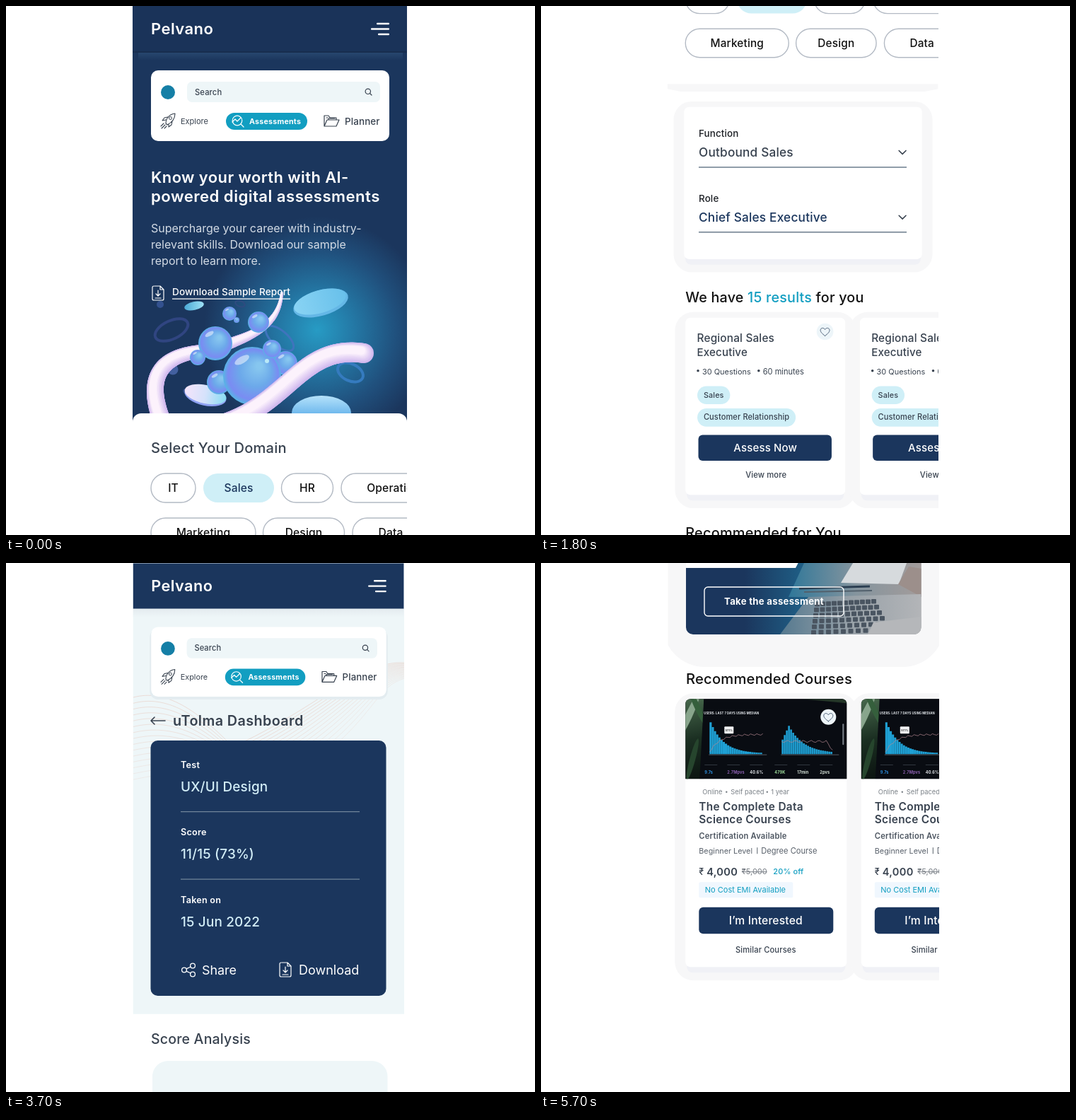
Animation of 748x748 px, one loop 6200 ms. Source, as an HTML page with a canvas:

```html
<!DOCTYPE html>
<html lang="en">
<head>
<meta charset="utf-8">
<title>Assessment app walkthrough</title>
<style>
html, body { margin: 0; width: 100%; height: 100%; overflow: hidden; background: #fff; }
canvas { display: block; width: 748px; height: 748px; }
</style>
</head>
<body>
<canvas id="stage"></canvas>
<script>
const SIZE = 748, LOOP = 6200, SHRINK = 0.9866;
const NAVY = '#1b365d', TEAL = '#129ec1', MINT = '#eef6f8', AQUA = '#cfeff7', INK = '#38424f';
const LEVELS = ['#93d9f2', '#5bbbdd', TEAL, NAVY];
const canvas = document.getElementById('stage');
const c = canvas.getContext('2d');
const dpr = window.devicePixelRatio || 1;
canvas.width = canvas.height = SIZE * dpr;

// ---------- helpers ----------
function group(draw, dx = 0, dy = 0, scale = 1) {
  c.save();
  c.translate(dx, dy);
  c.scale(scale, scale);
  draw();
  c.restore();
}

function paint(fill, stroke, width = 1.2) {
  if (fill) { c.fillStyle = fill; c.fill(); }
  if (stroke) { c.strokeStyle = stroke; c.lineWidth = width; c.stroke(); }
}

function box(x, y, w, h, r, fill, stroke, width) {
  c.beginPath();
  c.roundRect(x, y, w, h, r);
  paint(fill, stroke, width);
}

function disc(x, y, r, fill, stroke, width) {
  c.beginPath();
  c.arc(x, y, r, 0, 7);
  paint(fill, stroke, width);
}

function oval(x, y, rx, ry, deg, fill, stroke, width) {
  c.beginPath();
  c.ellipse(x, y, rx, ry, deg * Math.PI / 180, 0, 7);
  paint(fill, stroke, width);
}

function poly(points, fill, stroke, width) {
  c.beginPath();
  for (let i = 0; i < points.length; i += 2) c.lineTo(points[i], points[i + 1]);
  paint(fill, stroke, width);
}

function path(d, x, y, color, width = 1.2) {
  group(() => {
    c.strokeStyle = color;
    c.lineWidth = width;
    c.lineCap = c.lineJoin = 'round';
    c.stroke(new Path2D(d));
  }, x, y);
}

function linear(x0, y0, x1, y1, ...colors) {
  const g = c.createLinearGradient(x0, y0, x1, y1);
  colors.forEach((col, i) => g.addColorStop(i / (colors.length - 1), col));
  return g;
}

// y is the middle of the capital letters; heavier weights are set looser
function text(str, x, y, size, weight = 400, color = INK, align = 'left') {
  const tracking = weight >= 600 ? 0.02 : weight === 500 ? 0.01 : 0;
  c.font = `${weight} ${size}px Inter, "Open Sans", sans-serif`;
  c.letterSpacing = `${size * tracking}px`;
  c.textAlign = align;
  c.fillStyle = color;
  c.fillText(str, x, y + size * 0.36);
  return c.measureText(str).width;
}

function runs(x, y, size, ...parts) {
  for (const [str, weight, color] of parts) x += text(str, x, y, size, weight, color);
}

function fact(label, value, x, y, size) {
  runs(x, y, size, [label + ': ', 400], [value, 600]);
}

function card(x, y, w, h) {
  box(x - 15, y - 8, w + 30, h + 27, 26, '#f7f7f8');
  box(x + 2, y + 8, w - 4, h, 8, '#f0f1f6');
  box(x, y, w, h, 7, '#fff');
}

// ---------- icons ----------
const chevron = (x, y, color) => path('M-5-2.5L0 2.5L5-2.5', x, y, color, 1.6);

function heart(x, y, r) {
  disc(x, y, r, '#edf5f9');
  path('M0 6C-4 3-6.5 0.5-6.5-2C-6.5-5.5-2-6.5 0-3C2-6.5 6.5-5.5 6.5-2C6.5 0.5 4 3 0 6Z', x, y, '#4d6077', 1);
}

const fileIcon = (x, y, color) =>
  path('M-5-10H3L8-5V8Q8 10 6 10H-6Q-8 10-8 8V-8Q-8-10-6-10M3-10V-5H8M0-4V4M-3 1L0 4L3 1M-4 7H4', x, y, color, 1.2);

function shareIcon(x, y) {
  for (const [dx, dy] of [[-6, 0], [6, -6], [6, 6]]) disc(x + dx, y + dy, 3.4, null, '#fff', 1.3);
  path('M-3-1.6L3-4.5M-3 1.6L3 4.5', x, y, '#fff', 1.3);
}

// ---------- shared top ----------
function header(fill) {
  box(179, 0, 388, 65, 0, fill);
  text('Pelvano', 205, 32.5, 22, 600, '#fff');
  [[524, 25], [516, 32.5], [526, 40]].forEach(([x, y]) => box(x, y - 1.2, 542 - x, 2.4, 1, '#fff'));
}

function searchCard() {
  box(205, 91, 337, 100, 10, '#fff');
  disc(229, 122, 10, '#157fa6');
  box(256, 107, 273, 29, 7, MINT);
  text('Search', 267, 121.5, 11.2, 500);
  disc(511.8, 120.8, 3.7, null, INK, 1.2);
  path('M0 0L2.5 2.5', 514.5, 123.5, INK);
  path('M-4 4C-4-3 1-9 9-10C9-2 4 3-2 6ZM-4-1L-9 0L-6-4L-1-5M0 5L0 9L4 6L5 1M-5 6L-10 11M-7 4L-11 8M-3 8L-6 11', 230, 162, INK, 1.1);
  disc(232.5, 158.5, 2, null, INK, 1);
  text('Explore', 247, 163, 11, 400);
  box(311, 151, 115, 24, 12, TEAL);
  disc(327, 162, 6.8, null, '#fff', 1.2);
  path('M-7 2L-3-2L0 1L5-4M5 5L9 9', 327, 162, '#fff', 1.3);
  text('Assessments', 344, 163, 10.7, 700, '#fff');
  path('M-10 7V-8H-4L-2-5H7V-2M-10 7L-6-2H11L7 7ZM-7-5H-5M-4-2V-4H5', 460, 163, INK, 1.2);
  text('Planner', 479, 163, 13.4, 500);
}

// ---------- hero art ----------
function sphere(x, y, r) {
  const g = c.createRadialGradient(x + r * 0.25, y - r * 0.35, r * 0.1, x, y, r);
  [[0, '#86c6ef'], [0.5, '#6ca9ea'], [0.85, '#7a8cf2'], [1, '#56b6e4']].forEach(s => g.addColorStop(...s));
  disc(x, y, r, g);
  oval(x - r * 0.35, y - r * 0.55, r * 0.28, r * 0.12, -30, 'rgba(255,255,255,.5)');
}

// nested strokes from a lilac rim to a pale core
function tube(curves) {
  for (let layer = 0; layer < 8; layer++) {
    const k = layer / 7, lift = -0.26 * k;
    const color = `rgb(${208 + 44 * k},${184 + 58 * k},${238 + 14 * k})`;
    for (const [x0, y0, x1, y1, x2, y2, x3, y3, r0, r1] of curves) {
      for (let i = 0; i <= 150; i++) {
        const t = i / 150, u = 1 - t, r = r0 + (r1 - r0) * t;
        const mix = (a, b, d, e) => u * u * u * a + 3 * u * u * t * b + 3 * u * t * t * d + t * t * t * e;
        disc(mix(x0, x1, x2, x3) + r * lift, mix(y0, y1, y2, y3) + r * lift, r * (1 - 0.6 * k), color);
      }
    }
  }
}

function heroArt() {
  const glow = c.createRadialGradient(440, 458, 0, 440, 458, 160);
  [[0, '#279bc4'], [0.3, '#247ba8'], [0.7, '#20507d'], [1, NAVY]].forEach(s => glow.addColorStop(...s));
  box(179, 290, 388, 290, 0, glow);
  oval(234, 458, 25, 13, -25, null, '#304581', 4);
  oval(387, 470, 24, 11, 40, null, '#3f74bd', 3);
  oval(487, 518, 19, 12, 25, null, '#357bbf', 4);
  oval(268, 547, 17, 6, 10, null, '#34508c', 2);
  oval(331, 421, 7, 4, 20, null, '#2f4b80', 2);
  disc(218, 422, 5, '#33518f');
  disc(236, 514, 7.5, '#43609f');
  oval(266, 424, 14, 6, -12, linear(252, 424, 280, 424, '#4aa9d6', '#9fe2f6'));
  oval(445, 420, 40, 18, -16, '#64b7e6');
  oval(444, 418, 38, 16, -16, linear(405, 430, 485, 410, '#8ad4f4', '#66bfea'));
  oval(446, 575, 42, 24, 0, linear(446, 550, 446, 578, '#b8e4fb', '#6bb6ec'));
  tube([[390, 406, 385, 458, 340, 468, 290, 487, 2, 9], [290, 487, 235, 490, 185, 510, 226, 600, 9, 13]]);
  oval(282, 551, 30, 14, 12, '#8fa2f2');
  oval(282, 549, 30, 13, 12, linear(254, 545, 310, 555, '#f3e4fb', '#d5e2fb', '#8cdcf3'));
  [[316, 435, 10], [326, 444, 4], [357, 447, 15], [296, 477, 24], [271, 497, 11], [395, 505, 17],
   [301, 532, 17], [348, 523, 41], [376, 485, 13]].forEach(s => sphere(...s));
  disc(369, 502, 3, '#b9e9f7');
  tube([[506, 491, 420, 478, 400, 560, 310, 590, 14, 14]]);
}

// ---------- home page ----------
function jobCard(x, y) {
  card(x, y, 229, 254);
  text('Regional Sales', x + 16.5, y + 29, 15.6, 500);
  text('Executive', x + 16.5, y + 49.5, 15.3, 500);
  disc(x + 18, y + 76, 1.8, INK);
  text('30 Questions', x + 24, y + 77, 11.1);
  disc(x + 105, y + 76, 1.8, INK);
  text('60 minutes', x + 111, y + 77, 11.2);
  box(x + 17, y + 98, 47, 26, 13, AQUA);
  text('Sales', x + 26, y + 110.5, 11, 500);
  box(x + 17, y + 130, 141, 26, 13, AQUA);
  text('Customer Relationship', x + 26, y + 142.5, 11.2, 500);
  box(x + 18.5, y + 168, 191, 37, 6, NAVY);
  text('Assess Now', x + 114.5, y + 186, 15.2, 500, '#fff', 'center');
  text('View more', x + 115.5, y + 225, 11.4, 500, INK, 'center');
  heart(x + 200, y + 20, 12);
}

function jobRow(y) {
  jobCard(205, y);
  jobCard(455, y);
}

function field(label, value, y, valueColor, lineColor, arrow) {
  text(label, 224, y, 13.6, 500, '#1c1f24');
  text(value, 224, y + 27, 17.5, 500, valueColor);
  chevron(516, y + 27, arrow);
  box(224, y + 47.5, 298, 1.5, 0, lineColor);
}

function pill(label, x, y, w, on) {
  box(x, y, w, 41, 20.5, on ? AQUA : '#fff', on ? null : '#b3bac4', 1.4);
  text(label, x + w / 2, y + 20.5, 15.6, 500, on ? NAVY : '#111', 'center');
}

function homePage(chosen) {
  box(179, 0, 388, 600, 0, NAVY);
  header('#1a3359');
  box(179, 64, 388, 2, 0, '#172d4e');
  box(187, 66, 374, 11, 0, linear(0, 66, 0, 77, '#27466e', NAVY));
  heroArt();
  searchCard();
  text('Know your worth with AI-', 205, 242, 21.9, 600, '#fff');
  text('powered digital assessments', 205, 269, 22.2, 600, '#fff');
  ['Supercharge your career with industry-', 'relevant skills. Download our sample', 'report to learn more.']
    .forEach((row, i) => text(row, 205, 314.5 + i * 22.7, 16, 400, '#d3dbe5'));
  fileIcon(215, 406, '#fff');
  const w = text('Download Sample Report', 235, 404.5, 13.6, 500, '#fff');
  box(235, 413.5, w, 1.2, 0, '#fff');

  box(179, 576, 388, 1300, 12, '#fff');
  text('Select Your Domain', 205, 624.5, 20.1, 500);
  pill('IT', 205, 661, 63);
  pill('Sales', 279, 661, 100, true);
  pill('HR', 389.5, 661, 73);
  pill('Operations', 474, 661, 156);
  pill('Marketing', 205, 724, 148);
  pill('Design', 363.5, 724, 115);
  pill('Data', 490, 724, 108);

  group(() => {
    poly([179, 112, 567, 112, 567, 119, 548, 123, 198, 123, 179, 119], '#f7f7f8');
    card(203, 145, 341, 218);
    if (chosen) {
      field('Function', 'Outbound Sales', 183, INK, '#6b7c8c', INK);
      field('Role', 'Chief Sales Executive', 276, NAVY, '#6b7c8c', INK);
      runs(205, 418, 20, ['We have ', 500, '#111'], ['15 results', 500, TEAL], [' for you', 500, '#111']);
      jobRow(447);
    } else {
      field('Function', 'Select Your Function', 183, INK, '#6e7278', INK);
      field('Role', 'Select Your Role', 276, '#989b9f', '#bcbec1', '#8a8d92');
    }
    const drop = chosen ? 337.5 : 0;
    text('Recommended for You', 205, 418 + drop, 20.2, 500, '#111');
    jobRow(447 + drop);
  }, 0, 691);
}

// ---------- report page ----------
function contours() {
  c.lineWidth = 0.7;
  for (let i = 0; i < 15; i++) {
    c.strokeStyle = `rgba(226,170,150,${0.5 - i * 0.02})`;
    c.beginPath();
    c.moveTo(180, 190 + i * 8.3);
    c.bezierCurveTo(225, 178 + i * 8.5, 270, 205 + i * 6, 330, 270 + i * 3);
    c.moveTo(563, 141 + i * 1.6);
    c.bezierCurveTo(500 + i * 2, 138 + i * 2.5, 440 + i * 6, 205, 325 + i * 10, 258);
    c.stroke();
  }
}

function summary() {
  box(179.5, 0, 383.5, 637.7, 0, MINT);
  contours();
  group(() => {
    header(NAVY);
    box(179, 65, 388, 12, 0, linear(0, 65, 0, 77, '#e4ebef', MINT));
    box(203, 94, 341, 101, 12, '#e3ecf0');
    searchCard();
  }, 3, 0.6, SHRINK);
  path('M20 0H0M5-5L0 0L5 5', 205, 223, INK, 1.6);
  text('uTolma Dashboard', 236, 223, 19.8, 600);
  box(204.5, 251, 333, 361, 10, NAVY);
  [['Test', 'UX/UI Design'], ['Score', '11/15 (73%)'], ['Taken on', '15 Jun 2022']].forEach(([label, value], i) => {
    const y = 285 + i * 95.5;
    text(label, 247, y, 12.6, 600, '#fff');
    text(value, 247, y + 31, 18.9, 500, '#d3eef7');
    if (i < 2) box(247, y + 66, 253, 1.2, 0, '#71859a');
  });
  shareIcon(258, 575.5);
  text('Share', 277, 575.5, 17.9, 400, '#fff');
  fileIcon(395, 575, '#fff');
  text('Download', 414, 575.5, 18, 400, '#fff');
  text('Score Analysis', 205, 673, 19.5, 500);
}

function legend(x, y) {
  [['Beginner', '(0 - 25%)'], ['Intermediate', '(26 - 50%)'], ['Experienced', '(51 - 75%)'], ['Proficient', '(76 - 100%)']]
    .forEach(([name, range], i) => {
      const lx = x + (i % 2) * 122, ly = y + (i >> 1) * 53.5;
      box(lx, ly, 25, 25, 0, LEVELS[i]);
      text(name, lx + 32, ly + 4.5, 11.4, 500);
      text(range, lx + 32, ly + 20, 11.2, 500);
    });
}

function gauge() {
  const tilt = 0.01;
  LEVELS.forEach((color, i) => {
    const from = Math.PI * (1 + i / 4) + tilt;
    c.beginPath();
    c.arc(366.3, 645.2, 103, from, from + Math.PI / 4);
    paint(null, color, 37);
  });
  poly([430, 554, 373, 649.5, 362, 642.5], INK);
  [['0', 231, 640], ['25', 270, 546], ['50', 368, 511], ['75', 464, 550], ['100', 503.5, 640]]
    .forEach(([n, x, y]) => text(n, x, y, 12.8, 500, INK, 'center'));
  text('Experienced (73%)', 370, 692.5, 18.7, 600, INK, 'center');
}

function scoreCard() {
  box(207, 231, 332.5, 617, 22, MINT);
  runs(226, 284, 22.2, ['Prakash', 600], [' scored ', 400], ['73%', 600], [' and', 400]);
  text('completed the assessment', 226, 314, 22.9);
  runs(226, 343.5, 22.4, ['in ', 400], ['90%', 600], [' of the allotted time.', 400]);
  fact('Score', '11/15', 226, 394, 16.4);
  fact('Time Taken', '27 min 17 sec / 30 min', 226, 430, 17.2);
  gauge();
  legend(258, 733);
}

function skillCard(title, y) {
  box(205, y, 332.5, 300, 13, '#eff7ff');
  box(205, y, 332.5, 54.5, [13, 13, 0, 0], NAVY);
  text(title, 233, y + 27.5, 16.6, 600, '#fff');
  fact('Score', '11/15', 233, y + 82, 12.6);
  fact('Negative Points', '0', 233, y + 110.5, 12.8);
  fact('Time Taken', '20 min 7 sec / 30 min', 233, y + 139.5, 12.8);
  text('Question Analysis', 233, y + 181, 17.4, 600);
  fact('Total Questions', '10', 233, y + 214, 12.8);
  fact('Correct', '8', 233, y + 243, 12.8);
  fact('Wrong', '2', 233, y + 271.5, 12.8);
  fact('Skipped', '0', 391, y + 214, 12.8);
  fact('Not Answered', '0', 391, y + 243, 12.8);
}

function sections() {
  text('Section', 327, 16.5, 15, 600, INK, 'right');
  text('Percentage', 353, 16.5, 15.4, 600);
  text('UX Design', 327, 62.5, 17.1, 400, INK, 'right');
  text('UI Design', 327, 114, 17.1, 400, INK, 'right');
  box(353, 45, 182.5, 33.5, 0, NAVY);
  text('8/10 (80%)', 373, 62.5, 17, 600, '#fff');
  box(353, 96.5, 144.5, 33.5, 0, TEAL);
  text('3/5 (60%)', 370.5, 114, 17.2, 600, '#fff');
  legend(260, 172);
  text('Section-Skill Analysis', 205, 314.5, 19.8, 500);
  skillCard('Section 1: UX Design', 350);
  skillCard('Section 2: UX Design', 672);
}

function banner() {
  box(172, -365, 399, 512, 60, '#f7f7f8');
  c.save();
  box(205, -335, 332.5, 436, 10);
  c.clip();
  box(205, -335, 333, 436, 0, linear(205, 0, 538, 0, NAVY, NAVY, '#1f5f86', '#6d7f8c', '#98999c'));
  poly([372, 0, 440, -110, 538, -110, 538, 48, 350, 48], linear(350, 0, 538, 0, '#2f7799', '#84949e', '#a39c9b'));
  poly([424, 28, 446, -8, 520, -8, 506, 30], '#d6dadd');
  poly([505, 30, 520, 5, 538, 8, 538, 48], '#9c8f8b');
  poly([338, 101, 378, 48, 538, 44, 538, 101], linear(338, 0, 538, 0, '#55798f', '#98a1a8', '#b3b5b8'));
  for (let row = 0; row < 6; row++) {
    for (let k = 0; k < 11; k++) {
      box(387 - row + k * (8 + row * 0.5), 55 + row * 8 - k * 0.4, 7, 6.5, 1, '#4a5561');
    }
  }
  poly([470, 84, 538, 76, 538, 101, 462, 101], '#b5b7ba');
  poly([365, 36, 465, 33], null, '#2c3f52', 3);
  poly([372, 41, 468, 39], null, '#52606c', 2);
  poly([205, -335, 538, -335, 360, 7, 205, 7], '#fff');
  c.restore();
  box(231, 34, 197, 41, 5, null, '#fff', 1.4);
  text('Take the assessment', 329.5, 54, 13.2, 700, '#fff', 'center');
}

function chartPhoto(x, y) {
  const base = y + 78;
  c.save();
  box(x, y, 228, 113, [7, 7, 0, 0], '#0a0d13');
  c.clip();
  box(x, y, 26, 113, 0, linear(x, y, x + 26, y + 113, '#47684c', '#1b2f22', '#0b1310'));
  [[4, 25, 5, 38, 25], [17, 12, 4, 30, -25], [10, 85, 4, 30, 15]]
    .forEach(([dx, dy, rx, ry, deg], i) => oval(x + dx, y + dy, rx, ry, deg, ['#88a58c', '#355f3c', '#26452d'][i]));
  poly([x + 26, y, x + 228, y, x + 228, y + 113, x + 20, y + 113], '#090c12');
  poly([x + 165, y, x + 228, y, x + 228, y + 6], '#233527');
  text('USERS: LAST 7 DAYS USING MEDIAN', x + 26, y + 20, 4.2, 700, '#e8ecf0');
  for (let i = 0; i < 24; i++) {
    const decay = 44 * Math.exp(-i / 6) + 1;
    box(x + 34 + i * 3.1, base - decay, 3.1, decay, 0, '#1fa0d4');
    const bell = 39 * (i < 3 ? 0.5 + i / 6 : Math.exp(-(i - 3) / 7)) + 1;
    box(x + 136 + i * 3, base - bell, 2.6, bell, 0, '#1fa0d4');
  }
  c.beginPath();
  for (let i = 0; i <= 26; i++) c.lineTo(x + 34 + i * 2.9, y + 50 + 25 * Math.exp(-i / 5) + Math.sin(i * 2.1) * 1.2);
  paint(null, '#b88a94', 0.7);
  c.beginPath();
  for (let i = 0; i <= 24; i++) c.lineTo(x + 136 + i * 3, y + 60 + Math.sin(i * 1.7) * 1.5 + (i > 21 ? (i - 21) * 4 : 0));
  paint(null, '#b88a94', 0.7);
  box(x + 55, y + 39, 13, 10, 1, '#f1f2f4');
  text('57.1%', x + 61.5, y + 44, 3.6, 700, '#333', 'center');
  for (const dx of [33, 135]) box(x + dx, base + 0.5, 82, 0.6, 0, '#6d747c');
  box(x + 222, y + 35, 2, 30, 1, '#7c838b');
  [['9.7s', 27, '#2d8fe0'], ['2.7Mpvs', 59, '#8b5fb0'], ['40.6%', 91, '#e3e6ea'],
   ['479K', 126, '#9fdc9c'], ['17min', 158, '#d9e5da'], ['2pvs', 190, '#d9e5da']].forEach(([s, dx, color]) => {
    text(s, x + dx, y + 104, 5.6, 700, color);
    box(x + dx, y + 93, 18, 0.8, 0, '#3f464e');
  });
  c.restore();
}

function courseCard(x, y) {
  const left = x + 19, soft = '#7a8087';
  card(x, y, 228, 379);
  chartPhoto(x, y);
  heart(x + 202, y + 25.5, 11);
  text('Online', x + 24, y + 131.5, 9.3, 400, soft);
  disc(x + 58, y + 131.5, 1.2, soft);
  text('Self paced', x + 64, y + 131.5, 9.3, 400, soft);
  disc(x + 115.5, y + 131.5, 1.2, soft);
  text('1 year', x + 121, y + 131.5, 9.3, 400, soft);
  text('The Complete Data', left, y + 152, 15.4, 600);
  text('Science Courses', left, y + 170.5, 15.4, 600);
  text('Certification Available', left, y + 194, 11.2, 600, '#4d5661');
  text('Beginner Level', left, y + 214.5, 10.8, 400, '#59616b');
  box(x + 101, y + 210, 1, 9, 0, '#59616b');
  text('Degree Course', x + 107, y + 214.5, 11.1, 400, '#59616b');
  text('₹', left, y + 244, 12.5, 500);
  text('4,000', x + 30, y + 244, 14.6, 600);
  const w = text('₹5,000', x + 79.5, y + 244, 11, 400, '#777d84');
  box(x + 79.5, y + 244, w, 1, 0, '#777d84');
  text('20% off', x + 124, y + 244, 11, 500, TEAL);
  box(left, y + 259, 133, 22, 2, '#f0f7fe');
  text('No Cost EMI Available', x + 27.5, y + 270, 11, 400, TEAL);
  box(left, y + 294.5, 190, 37.5, 6, NAVY);
  text('I’m Interested', x + 113.5, y + 313, 15.7, 500, '#fff', 'center');
  text('Similar Courses', x + 113.5, y + 355, 11.2, 500, INK, 'center');
}

function courses() {
  banner();
  text('Recommended Courses', 205, 163.5, 20.2, 500, '#111');
  courseCard(204.3, 192.3);
  courseCard(452.8, 192.3);
}

function reportPage() {
  summary();
  group(scoreCard, 0, 473);
  group(sections, 0, 1419);
  group(courses, 0, 2838);
}

// ---------- timeline ----------
function sceneAt(t) {
  const step = (from, every, max) => t < from ? 0 : Math.min(max, Math.floor((t - from) / every) + 1);
  if (t < 1800) return { page: 'home', scroll: step(500, 100, 5) * 138.2 };
  if (t < 3700) return { page: 'results', scroll: 682 + step(2800, 200, 3) * 109 };
  return { page: 'report', scroll: step(4700, 200, 6) * 473 };
}

function render({ page, scroll }) {
  c.setTransform(dpr, 0, 0, dpr, 0, 0);
  c.fillStyle = '#fff';
  c.fillRect(0, 0, SIZE, SIZE);
  c.save();
  c.beginPath();
  if (page === 'home') c.rect(179, 0, 388, SIZE);
  else if (page === 'results') c.rect(178.6, 0, 383.4, SIZE);
  else c.rect(179.5, 0, 383.5, SIZE);
  c.clip();
  if (page === 'home') group(() => homePage(false), 0, -scroll);
  else if (page === 'results') group(() => homePage(true), 2, -scroll, SHRINK);
  else group(reportPage, 0, -scroll);
  c.restore();
}

const start = performance.now();
let shown = '';
function tick() {
  const scene = sceneAt((performance.now() - start) % LOOP);
  const key = scene.page + scene.scroll;
  if (key !== shown) {
    shown = key;
    render(scene);
  }
  requestAnimationFrame(tick);
}
tick();
</script>
</body>
</html>
```
